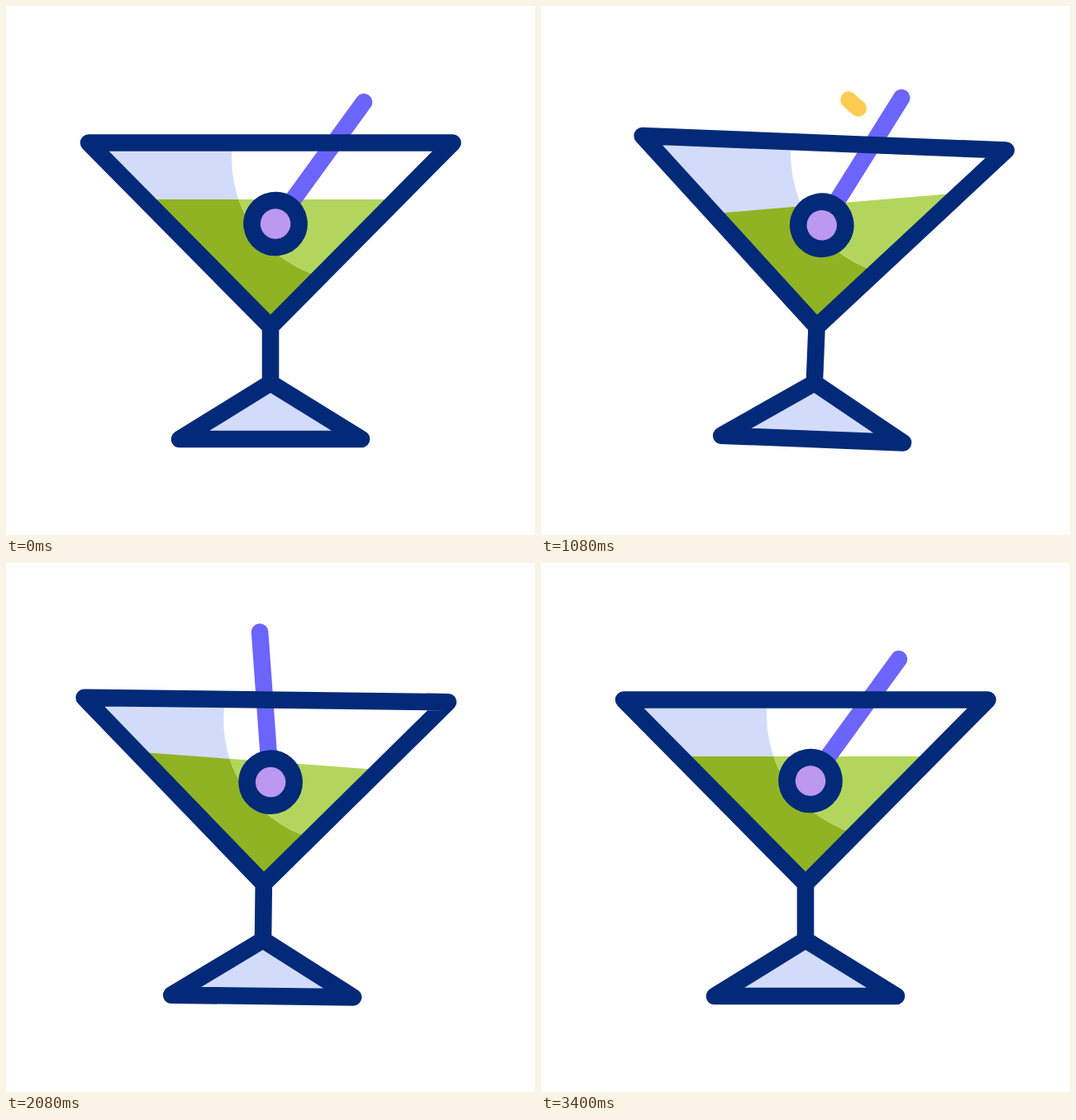
These frames come from a looping animation (640x640 px, 3.6 s). An HTML page:

```html
<!DOCTYPE html>
<html lang="en">
<head>
<meta charset="utf-8">
<title>Cocktail</title>
<style>
  html, body { margin: 0; width: 100%; height: 100%; overflow: hidden; background: #fff; }
  svg { display: block; width: 100%; height: 100%; }
  .line { fill: none; stroke: #032a78; stroke-width: 20.6; stroke-linecap: round; stroke-linejoin: round; }
</style>
</head>
<body>
<svg viewBox="0 0 640 640">
  <defs>
    <clipPath id="bowl"><path d="M100 165.5H540.4L320 388Z"/></clipPath>
    <clipPath id="shine">
      <circle class="shine" cx="421" cy="185" r="148"/>
      <rect class="shine" x="421" width="300" height="300"/>
    </clipPath>
  </defs>
  <g id="glass">
    <path d="M320 456L210 524H430Z" fill="#d2dcfa"/>
    <g clip-path="url(#bowl)">
      <rect x="80" y="150" width="480" height="250" fill="#d2dcfa"/>
      <rect class="liquid" y="234" width="640" height="250" fill="#90b324"/>
      <g clip-path="url(#shine)">
        <rect x="80" y="150" width="480" height="250" fill="#fff"/>
        <rect class="liquid" y="234" width="640" height="250" fill="#b2d65d"/>
      </g>
    </g>
    <path class="straw" d="M0 0V-182" fill="none" stroke="#6c65fb" stroke-width="20.6" stroke-linecap="round"/>
    <path class="line" d="M100 165.5H540.4L320 388ZM320 388V456L210 524H430L320 456"/>
    <g class="straw">
      <circle r="28.5" fill="#bc98f0" stroke="#032a78" stroke-width="20.6"/>
      <path id="trail" d="M18 -171C4 -152 -22 -137 -53 -146" pathLength="100" fill="none"
        stroke="#ffcb50" stroke-width="20" stroke-linecap="round"/>
    </g>
  </g>
</svg>
<script>
const LOOP = 3600, START = 200, END = 3390;
const STIR_START = 207, STIR_PERIOD = 807, STIR_TURNS = 3, REST_ANGLE = 36, STIR_LOW = -20;

const glass = document.getElementById('glass');
const trail = document.getElementById('trail');
const clamp = v => Math.min(1, Math.max(0, v));
const ease = v => (1 - Math.cos(Math.PI * clamp(v))) / 2;
const sin = deg => Math.sin(deg * Math.PI / 180);

// Ease out to a first peak, swing once back to a last peak, ease home
function swing(t, amp, start, first, last, end) {
  if (t < first) return amp * ease((t - start) / (first - start));
  if (t > last) return amp * ease((end - t) / (end - last));
  return amp * Math.cos(2 * Math.PI * (t - first) / (last - first));
}

// 0 at rest, 1 in full motion
const hold = (t, fadeIn, fadeOut) => ease((t - START) / fadeIn) * ease((END - t) / fadeOut);

function stirAngle(t) {
  const turns = Math.min(STIR_TURNS, Math.max(0, (t - STIR_START) / STIR_PERIOD));
  const reach = REST_ANGLE - STIR_LOW - 3 * Math.sin(Math.PI * turns / STIR_TURNS);
  return STIR_LOW + reach * (1 + Math.cos(2 * Math.PI * turns)) / 2;
}

function transform(name, value) {
  document.querySelectorAll('.' + name).forEach(el => el.setAttribute('transform', value));
}

// One trail per turn, as the straw swings to the right
function drawTrail(t) {
  const since = t - STIR_START - STIR_PERIOD / 2;
  const turn = Math.min(STIR_TURNS - 1, Math.max(0, Math.floor(since / STIR_PERIOD)));
  const age = since - turn * STIR_PERIOD;
  const head = 100 * clamp((age - 20) / 170);
  const tail = 100 * clamp((age - 100) / 460);
  trail.style.display = head > tail ? '' : 'none';
  trail.setAttribute('stroke-dasharray', `${Math.max(0, head - tail)} 300`);
  trail.setAttribute('stroke-dashoffset', -tail);
}

function draw(t) {
  const lean = swing(t, 4, START, 836, 2436, 3220);
  const slide = swing(t, 10, 620, 1265, 2815, 3220);
  glass.setAttribute('transform', `translate(${slide} 0) rotate(${lean} 320 524)`);

  const tilt = swing(t, -7.4, START, 1000, 2610, END);
  transform('liquid', `translate(0 ${6 * hold(t, 650, 890)}) rotate(${tilt} 320 234)`);
  transform('shine', `rotate(${tilt} 346 122)`);

  const angle = stirAngle(t), stirring = hold(t, 350, 1000);
  const x = 326 + 9.5 * (sin(REST_ANGLE) * (1 - stirring) - sin(angle));
  transform('straw', `translate(${x} ${263.5 + 1.5 * stirring}) rotate(${angle})`);
  drawTrail(t);
}

const begin = performance.now();
function tick() {
  draw((performance.now() - begin) % LOOP);
  requestAnimationFrame(tick);
}
tick();
</script>
</body>
</html>
```
